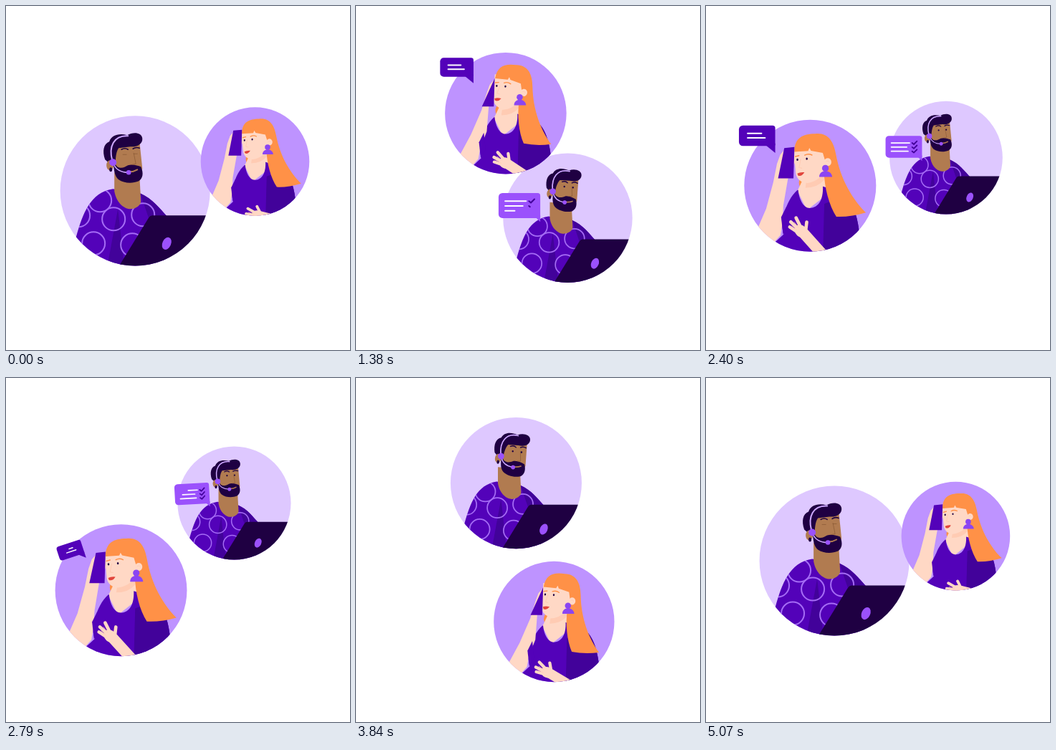
Write an HTML page with a canvas that moves like this. It is 480 px wide and 480 px high and loops after 5100 ms.

```html
<!DOCTYPE html>
<html lang="en">
<head>
<meta charset="utf-8">
<title>Support call</title>
<style>
html, body { margin: 0; width: 100%; height: 100%; overflow: hidden; background: #fff; }
canvas { display: block; width: 480px; height: 480px; }
</style>
</head>
<body>
<canvas id="stage" width="480" height="480"></canvas>
<script>
const ctx = document.getElementById('stage').getContext('2d');
const LOOP = 5100, STEP = 30, TAU = Math.PI * 2;
const C = {
  lilac: '#dec8ff', violet: '#be93ff', bright: '#9b51fc', ring: '#a56cf5',
  purple: '#5302b9', deep: '#42029a', ink: '#1f0042',
  tan: '#b17b50', tanDark: '#8d5c38', skin: '#ffd8c5', blush: '#ffcbb3',
  hair: '#ff9147', lip: '#e2453c', band: '#cda9ff'
};

const clamp = v => Math.max(0, Math.min(1, v));
const ramp = (t, from, length) => clamp((t - from) / length);

function fill(d, color) {
  ctx.fillStyle = color;
  ctx.fill(new Path2D(d));
}
function line(d, color, width) {
  ctx.strokeStyle = color;
  ctx.lineWidth = width;
  ctx.lineCap = ctx.lineJoin = 'round';
  ctx.stroke(new Path2D(d));
}
function oval(x, y, rx, ry, color, turn = 0) {
  ctx.beginPath();
  ctx.ellipse(x, y, rx, ry, turn, 0, TAU);
  ctx.fillStyle = color;
  ctx.fill();
}
function group(draw) {
  ctx.save();
  draw();
  ctx.restore();
}
function pivot(x, y, angle) {
  ctx.translate(x, y);
  ctx.rotate(angle);
  ctx.translate(-x, -y);
}

// Round window; content is drawn in its own design coordinates
function portrait(pos, home, color, draw) {
  group(() => {
    ctx.beginPath();
    ctx.arc(pos.x, pos.y, pos.r, 0, TAU);
    ctx.clip();
    ctx.fillStyle = color;
    ctx.fillRect(0, 0, 480, 480);
    const s = pos.r / home.r;
    ctx.translate(pos.x, pos.y);
    ctx.scale(s, s);
    ctx.translate(-home.x, -home.y);
    draw();
  });
}

function drawMan(sway, blink) {
  const shirt = 'M60 400L99 321C108 290 118 260 150 255L188 261C206 269 214 281 228 296L228 400Z';
  group(() => {
    fill(shirt, C.purple);
    ctx.clip(new Path2D(shirt));
    fill('M157 283L142 364L166 364Z', C.deep);
    fill('M188 261C206 269 214 281 228 296L200 296Z', C.deep);
    ctx.strokeStyle = C.ring;
    ctx.lineWidth = 2;
    for (const [x, y] of [[151, 297], [123, 331], [177, 333], [192, 291], [132, 271], [102, 292]]) {
      ctx.beginPath();
      ctx.arc(x, y, 16, 0, TAU);
      ctx.stroke();
    }
  });
  fill('M152 232L152 258C155 276 167 283 174 283C182 283 189 278 189 272L187 235Z', C.tan);
  group(() => {
    pivot(172, 255, sway);
    fill('M151 194L187 188L191 226L186 244L155 244Z', C.tan);
    fill('M139 214C135 202 137 192 145 189C148 180 158 177 170 180C178 175 190 176 191 184C192 192 184 197 174 196L158 198C154 204 154 211 153 225L147 221Z', C.ink);
    fill('M151 218L156 224C162 227 166 225 171 222C177 220 184 222 189 224C193 233 192 240 186 244C177 248 165 247 158 242C153 238 151 230 151 218Z', C.ink);
    oval(146, 222, 5, 7, C.tan);
    oval(147, 228, 2, 3, C.ink);
    line('M173 231Q179 231 184 228', C.tan, 2);
    line('M179 205L182 220L177 221', C.tanDark, 0.8);
    line('M162 200Q167 197 171 200M178 199Q182 196 187 198', C.ink, 1.6);
    if (blink) line('M164 207H169M179 206H184', C.tanDark, 0.8);
    else {
      oval(167, 207, 1.4, 1.5, C.ink);
      oval(181, 206, 1.4, 1.5, C.ink);
    }
    line('M149 215C144 196 151 180 171 181', C.band, 2);
    line('M151 220C154 228 162 232 171 232', C.band, 1.7);
    oval(150, 218, 5, 5, C.bright);
    oval(172, 232, 3.3, 3.3, C.bright);
  });
  fill('M205 292H300V400H135L160 360L200 295Q202 292 205 292Z', C.ink);
  oval(225, 331, 6, 9, C.bright, 0.42);
}

function drawPalm(c, s) {
  group(() => {
    ctx.translate(154.5 + 91 * (-0.05 + 0.1 * c + 0.06 * s), 200 + 91 * (0.85 + 0.15 * c));
    ctx.rotate(-0.3 * (c + 0.8));
    line('M4 2L38 36', C.skin, 15);
    oval(0, -1, 10, 8, C.skin, 0.7);
    line('M-4 1L-16 -6M-3 -3L-15 -13M0 -5L-8 -19M6 1L7 -14', C.skin, 4.6);
    line('M-6 -2L-13 -8M-4 -6L-10 -13', C.blush, 0.7);
  });
}

function drawWoman(c, s, k) {
  const px = v => 154.5 + 91 * v, py = v => 200 + 91 * v;
  const shape = (pts, color) =>
    fill('M' + pts.map(([x, y]) => px(x) + ' ' + py(y)).join('L') + 'Z', color);
  const sway = 0.085 * (0.17 - k);

  oval(145, 196, 6, 9, C.hair);
  fill('M147 186L137 207L150 234L178 212L174 176Z', C.skin);
  fill('M149 195Q163 195 173 183L174 192Q165 203 148 203Z', C.blush);
  fill('M137 206C128 214 122 226 119 238C114 250 116 260 118 267L104 280L112 300H250L222 262C219 238 212 218 195 208L172 201C173 222 164 231 154 231C145 231 139 218 138 206Z', C.purple);
  fill('M174 225L172 300H245L222 262C219 238 212 222 203 214Z', C.deep);

  // forearm follows the phone
  shape([
    [-0.29 - 0.1 * k, -0.55], [-0.36 - 0.1 * k, -0.47], [-0.41 - 0.1 * k, -0.33],
    [-0.48 - 0.085 * k, -0.05], [-0.62 - 0.05 * k, 0.35], [-0.79 - 0.03 * k, 0.7],
    [-0.95, 1.1], [-0.6, 0.92], [-0.45, 0.75], [-0.42, 0.58], [-0.36 - 0.05 * k, 0.3],
    [-0.31 - 0.03 * k, -0.1], [-0.21, -0.4], [-0.23 - 0.06 * k, -0.55]
  ], C.skin);
  shape([[-0.36, 0.32], [-0.44, 0.48], [-0.41, 0.74], [-0.33, 0.6]], C.purple);

  group(() => {
    pivot(171, 187, sway);
    fill('M134 145L135 181C136 189 142 195 151 195C162 194 173 187 177 176L180 144Z', C.skin);
    fill('M135 151C136 132 148 127 165 128C183 127 190 140 192 158C196 193 211 222 228 241Q207 246 187 244C178 228 173 203 174 180L178 172L174 155L158 151L156 147L154 151L135 151Z', C.hair);
    oval(180, 168, 5, 5.5, C.skin);
    line('M178 167Q181 165 182 168', C.blush, 0.9);
    oval(138.5, 162, 1.3, 1.6, C.ink);
    oval(151.5, 161.5, 1.3, 1.6, C.ink);
    line('M136 157.5L141 156.5M149 156.5Q154 154 159 157', C.hair, 1.5);
    line('M143 162L140 173L144 174', C.blush, 1);
    fill('M137 181Q141 179 147 180Q143 186 138 184Z', C.lip);
  });
  oval(175.5, 176, 4.6, 4.6, '#8b45f2');
  fill('M167 188C167 177 184 177 185 188Z', '#8b45f2');

  shape([
    [-0.29 - 0.11 * k, -0.57], [-0.21 - 0.03 * k, -0.585],
    [-0.225 - 0.03 * k, -0.11], [-0.44 - 0.05 * k, -0.11]
  ], C.purple);
  drawPalm(c, s);
}

// Bubble grows and turns about the tip of its tail; units are portrait radii
function bubble(pos, tip, size, draw) {
  if (size <= 0.01) return;
  group(() => {
    ctx.translate(pos.x + tip[0] * pos.r, pos.y + tip[1] * pos.r);
    ctx.rotate(-1.07 * (1 - size));
    ctx.scale(pos.r * size, pos.r * size);
    draw();
  });
}
function box(w, top, h, tail, color) {
  ctx.fillStyle = color;
  ctx.beginPath();
  ctx.roundRect(-w, top, w, h, [0.06, 0.04, 0.02, 0.06]);
  ctx.fill();
  fill(`M${-tail} ${top + h - 0.01}L0 0V${top + h - 0.04}Z`, color);
}
function textLine(x, y, w, grow, shrink) {
  if (grow <= 0 || shrink >= 1) return;
  line(`M${x + w * shrink} ${y}H${x + w * grow}`, '#fff', 0.022);
}
function popSize(t, start, end) {
  const rise = 1 - ramp(t, start, 240), fall = ramp(t, end, 220);
  return 1 - rise * rise - fall * fall;
}

function womanBubble(pos, t) {
  bubble(pos, [-0.53, -0.495], popSize(t, 593, 2670), () => {
    box(0.55, -0.418, 0.312, 0.14, C.purple);
    textLine(-0.418, -0.297, 0.21, ramp(t, 700, 160), ramp(t, 2680, 180));
    textLine(-0.418, -0.23, 0.264, ramp(t, 800, 180), ramp(t, 2755, 180));
  });
}

function manBubble(pos, t) {
  bubble(pos, [-0.425, 0.06], popSize(t, 700, 2740), () => {
    box(0.645, -0.445, 0.387, 0.07, C.bright);
    [0.323, 0.273, 0.296].forEach((w, i) => {
      const y = -0.32 + i * 0.074;
      textLine(-0.543, y, w, ramp(t, 740 + i * 260, 240), ramp(t, 2700 + i * 60, 190));
      const p = ramp(t, 1250 + i * 110, 110);
      if (p <= 0) return;
      const a = Math.min(1, p * 3), b = clamp(p * 1.5 - 0.5), x = -0.175;
      line(`M${x} ${y}L${x + 0.03 * a} ${y + 0.025 * a}` +
        (b > 0 ? `L${x + 0.03 + 0.055 * b} ${y + 0.025 - 0.055 * b}` : ''), C.deep, 0.023);
    });
  });
}

function render(now) {
  const t = Math.floor((now % LOOP) / STEP) * STEP;
  const a = TAU * t / LOOP;
  const c = Math.cos(a), s = Math.sin(a), k = Math.cos(2 * a);
  const man = {
    x: 255.4 - 75.2 * c + 30.6 * s,
    y: 225.1 + 30.6 * c + 77 * s + 2.1 * k - 1.1 * Math.sin(2 * a),
    r: 91.6 + 13 * c + 0.3 * s
  };
  const woman = {
    x: 248 + 99.5 * c - 26.5 * s,
    y: 243 - 26 * c - 97.5 * s,
    r: 84 - 8.2 * c - 0.3 * s
  };
  ctx.fillStyle = '#fff';
  ctx.fillRect(0, 0, 480, 480);
  portrait(man, { x: 181, y: 257.5, r: 104.5 }, C.lilac,
    () => drawMan(0.09 * (1 - k), t >= 4980 || t < 30));
  portrait(woman, { x: 154.5, y: 200, r: 91 }, C.violet, () => drawWoman(c, s, k));
  manBubble(man, t);
  womanBubble(woman, t);
}

let start;
function tick(now) {
  if (start === undefined) start = now;
  render(now - start);
  requestAnimationFrame(tick);
}
render(0);
requestAnimationFrame(tick);
</script>
</body>
</html>
```
